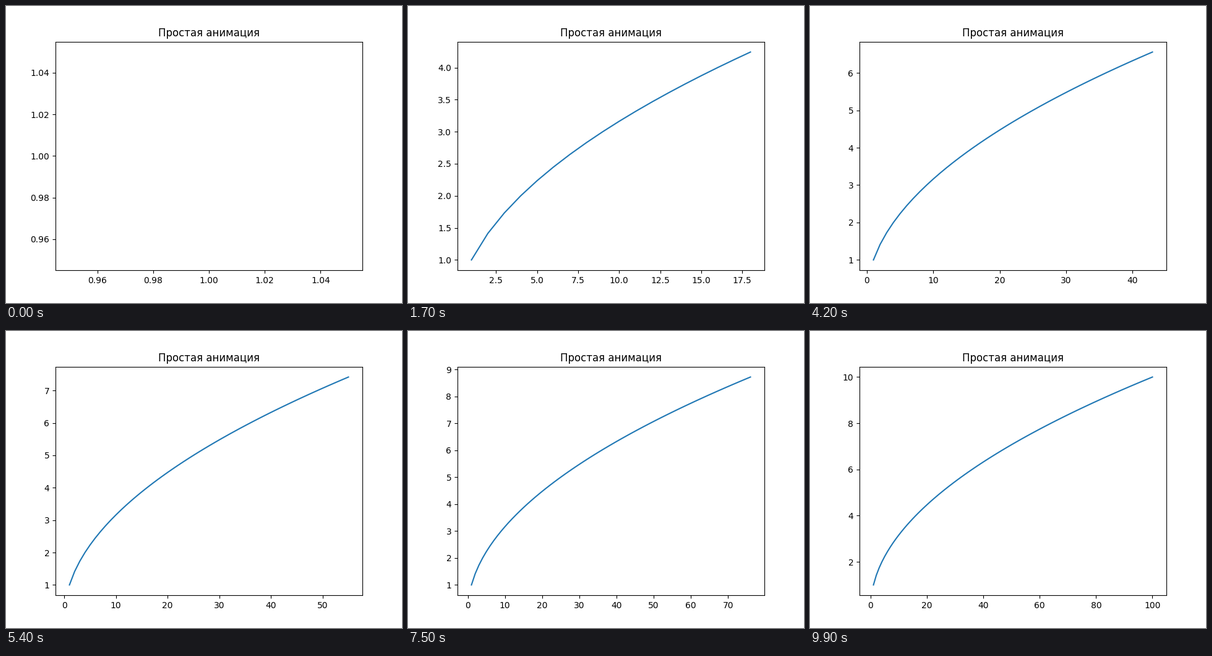
A matplotlib script for the animation above (10 s loop, 640 px wide and 480 px high).

```python
import matplotlib.pyplot as plt
import numpy as np
from matplotlib.animation import FuncAnimation

POINTS = 100
INTERVAL = 100  # ms

plt.rcParams["font.family"] = "DejaVu Sans"

fig, ax = plt.subplots(figsize=(6.4, 4.8), dpi=100)
x = np.arange(1, POINTS + 1)
y = np.sqrt(x)


def update(i):
    """Plot the first i + 1 points and let the axes rescale to them."""
    ax.clear()
    ax.set_title("Простая анимация")
    return ax.plot(x[:i + 1], y[:i + 1])


anim = FuncAnimation(fig, update, frames=POINTS, interval=INTERVAL,
                     init_func=lambda: update(0), repeat=True, repeat_delay=0)

plt.show()
```
